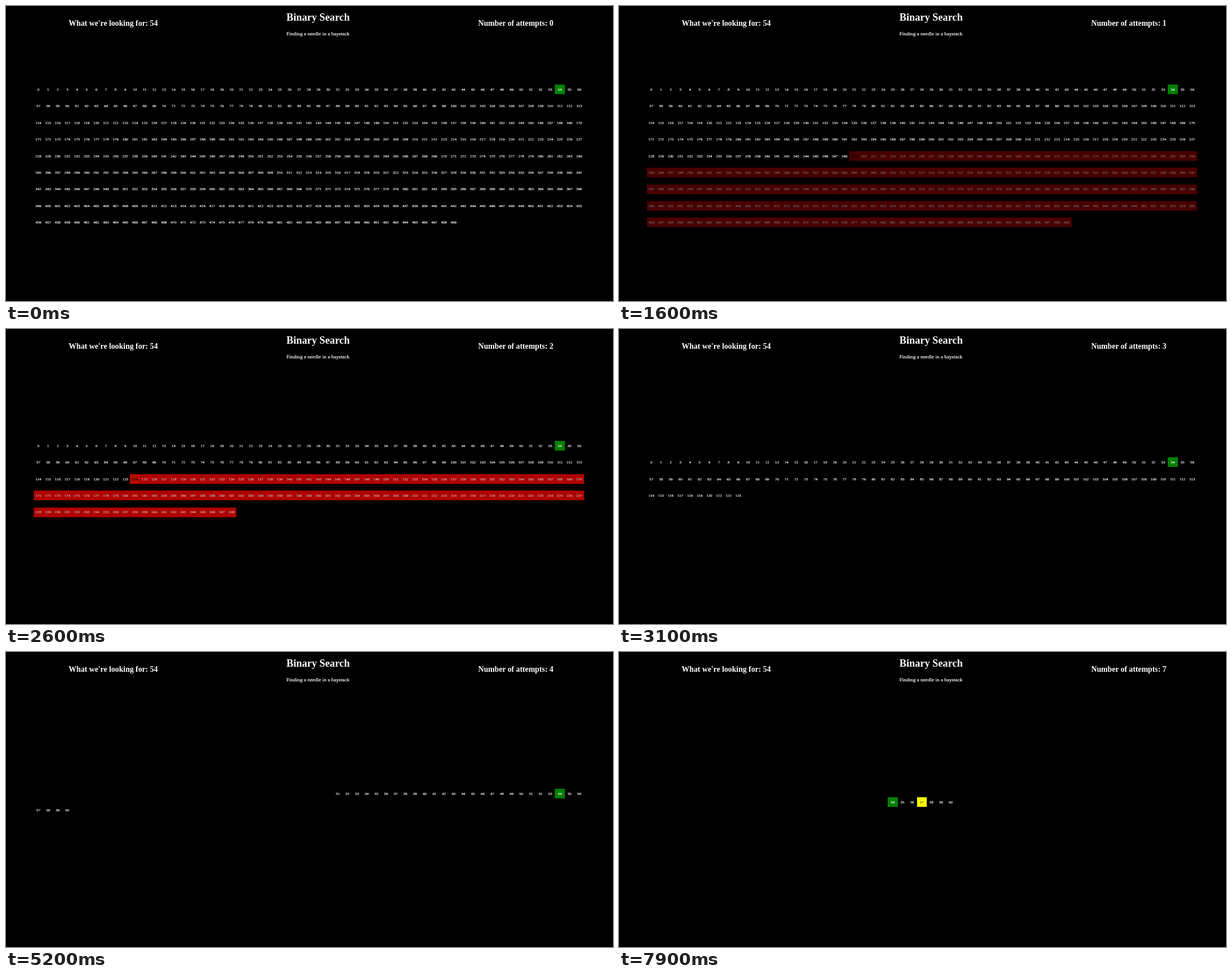
An HTML page that plays this animation: 1073 px wide and 522 px high, repeating every 8000 ms.

```html
<!DOCTYPE html>
<html lang="en">
<head>
<meta charset="utf-8">
<title>Binary Search</title>
<style>
  html, body { margin: 0; width: 100%; height: 100%; overflow: hidden; background: #000; }
  svg { display: block; width: 1073px; height: 522px; background: #000; font-family: "Liberation Serif", Times, serif; fill: #fff; }
  .head { font-size: 13.72px; font-weight: bold; }
  .title { font-size: 18.3px; font-weight: bold; }
  .sub { font-size: 9.2px; stroke: #fff; stroke-width: .2px; }
  .cells { font-size: 6.86px; text-anchor: middle; }
  .cells text { stroke-width: .2px; }
  .cells rect { shape-rendering: crispEdges; }
</style>
</head>
<body>
<svg viewBox="0 0 1073 522" xmlns="http://www.w3.org/2000/svg">
  <text class="head" x="110.8" y="35.2">What we're looking for: 54</text>
  <text class="title" x="495.7" y="26.4">Binary Search</text>
  <text class="sub" x="495.7" y="52">Finding a needle in a haystack</text>
  <text class="head" x="834.8" y="35.2" id="count"></text>
  <g class="cells" id="cells"></g>
</svg>
<script>
const LOOP = 8000, TOTAL = 500, NEEDLE = 54, COLS = 57;
const CELL_W = 17.07, ROW_H = 29.4, BOX = 17, CX = 535.2, CY = 265.3;
const FIRST = 800, PERIOD = 1150, LEAD = 50, FADE_AT = 440, FADE_MS = 510;
const NS = 'http://www.w3.org/2000/svg';
const count = document.getElementById('count');
const group = document.getElementById('cells');

const clamp = v => Math.max(0, Math.min(1, v));
const add = (parent, tag) => parent.appendChild(document.createElementNS(NS, tag));

const cells = Array.from({ length: TOTAL }, (_, i) => {
  const g = add(group, 'g'), rect = add(g, 'rect'), text = add(g, 'text');
  rect.setAttribute('width', CELL_W);
  rect.setAttribute('height', BOX);
  text.textContent = i;
  return { g, rect, text };
});

// Each round keeps the half of [lo, hi] that holds the needle.
const rounds = [];
for (let lo = 0, hi = TOTAL - 1; lo <= hi;) {
  const mid = (lo + hi) >> 1;
  rounds.push({ lo, hi, mid });
  if (mid === NEEDLE) break;
  if (mid < NEEDLE) lo = mid + 1; else hi = mid - 1;
}

let placed = null;
function place({ lo, hi }) {
  const n = hi - lo + 1;
  const left = CX - Math.min(n, COLS) * CELL_W / 2;
  const top = CY - (Math.ceil(n / COLS) - 1) * ROW_H / 2;
  cells.forEach(({ g, rect, text }, i) => {
    const shown = i >= lo && i <= hi;
    g.style.display = shown ? '' : 'none';
    if (!shown) return;
    const x = left + (i - lo) % COLS * CELL_W;
    const y = top + Math.floor((i - lo) / COLS) * ROW_H;
    rect.setAttribute('x', x);
    rect.setAttribute('y', y - BOX / 2);
    text.setAttribute('x', x + CELL_W / 2);
    text.setAttribute('y', y + 2.2);
  });
}

function paint({ g, rect, text }, fill, alpha, ink, opacity) {
  rect.setAttribute('fill', fill);
  rect.setAttribute('fill-opacity', alpha);
  text.setAttribute('fill', ink);
  text.setAttribute('stroke', ink);
  g.setAttribute('opacity', opacity);
}

function draw(t) {
  const step = Math.floor((t - FIRST + LEAD) / PERIOD);
  const round = rounds[Math.max(0, step)];
  const { lo, hi, mid } = round;
  if (placed !== round) place(placed = round);
  count.textContent = 'Number of attempts: ' + (step + 1);

  const age = step < 0 ? 0 : Math.max(0, t - FIRST - step * PERIOD);
  const lit = clamp(age / 200);
  const grey = Math.round(255 * (1 - clamp(age / 300)));
  const p = clamp((age - FADE_AT) / FADE_MS);
  const red = Math.sin(Math.PI * p) ** 1.5;
  const opacity = 1 - p ** 1.5;

  for (let i = lo; i <= hi; i++) {
    const out = mid < NEEDLE ? i < mid : i > mid;
    if (i === NEEDLE) paint(cells[i], '#008000', 1, '#fff', 1);
    else if (i === mid) {
      const green = Math.round(255 * (1 - (p < .5 ? red : 1)));
      paint(cells[i], `rgb(255,${green},0)`, p < .5 ? lit : red, `rgb(${grey},${grey},${grey})`, opacity);
    }
    else if (out) paint(cells[i], '#f00', red, '#fff', opacity);
    else paint(cells[i], '#000', 0, '#fff', 1);
  }
}

const start = performance.now();
function tick() {
  draw((performance.now() - start) % LOOP);
  requestAnimationFrame(tick);
}
tick();
</script>
</body>
</html>
```
